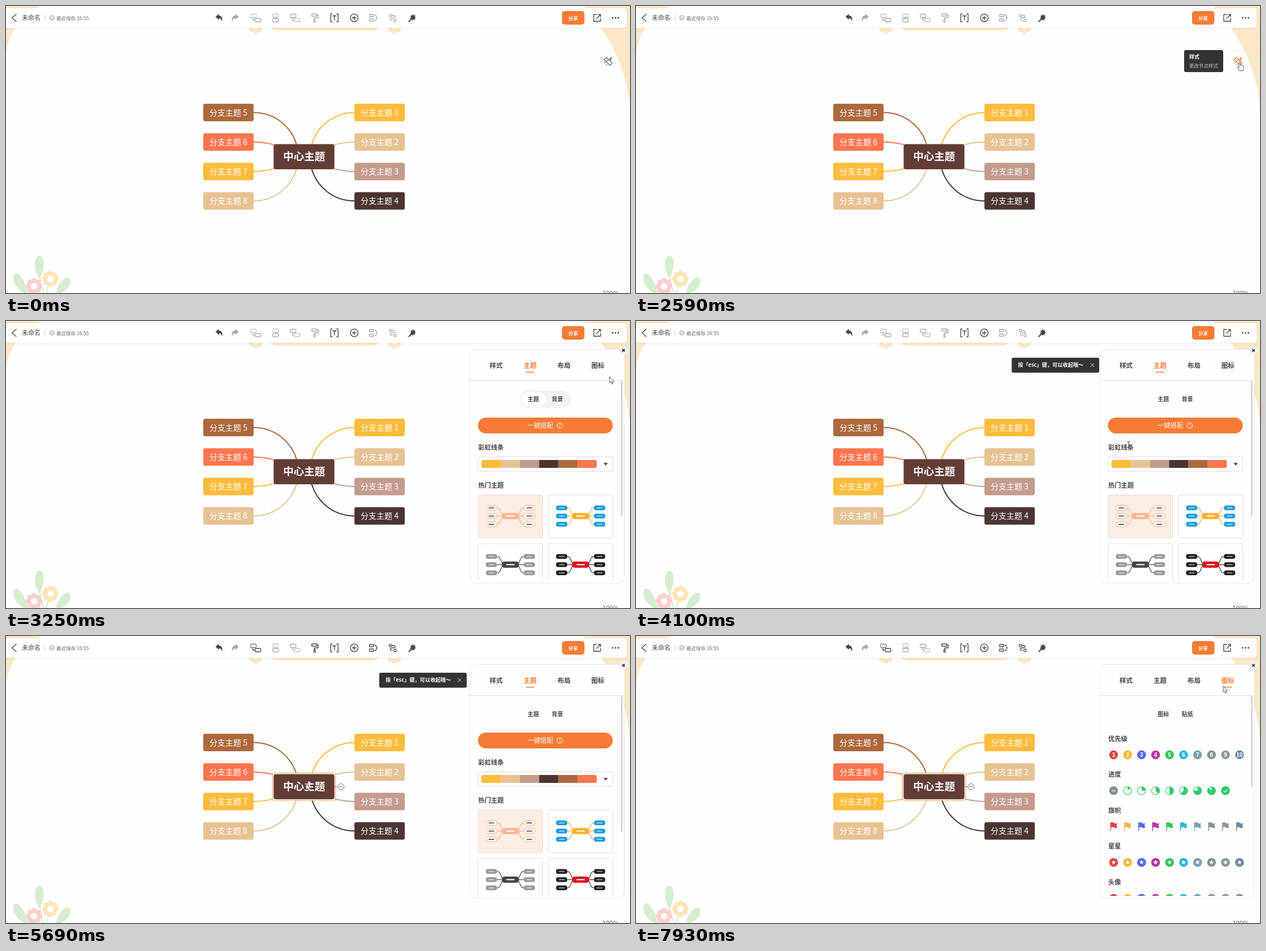
Recreate the animation shown at these times as an HTML page. Size 1102 px wide and 508 px high, loop 8000 ms.

```html
<!DOCTYPE html>
<html lang="zh-CN">
<head>
<meta charset="utf-8">
<style>
html, body { margin: 0; width: 100%; height: 100%; overflow: hidden; background: #fefefe; }
svg { display: block; width: 1102px; height: 508px; }
text { font-family: "Noto Sans CJK SC", "Noto Sans CJK", "Noto Sans CJK JP", sans-serif; }
.ln { fill: none; stroke: currentColor; stroke-width: 1.3; stroke-linecap: round; stroke-linejoin: round; }
</style>
</head>
<body>
<svg id="stage" viewBox="0 0 1102 508"></svg>
<script>
const ORANGE = '#f77b34', DARK = '#444', GREY = '#a9a9a9', CREAM = '#fbe8c8';
const WARM = ['#febb3c', '#e7c292', '#c49b8d', '#4d3434', '#ad683d', '#ff7650'];
const HUES = ['#e04444', '#f7b73c', '#4f68f2', '#b837a8', '#32c75c', '#30b4e0', '#7ba1aa', '#859293', '#8b9896', '#7088a1'];

const rect = (x, y, w, h, fill, rx = 0, more = '') =>
  `<rect x="${x}" y="${y}" width="${w}" height="${h}" fill="${fill}" rx="${rx}" ${more}/>`;
const circ = (x, y, r, fill, more = '') => `<circle cx="${x}" cy="${y}" r="${r}" fill="${fill}" ${more}/>`;
const path = (d, more = 'class="ln"') => `<path d="${d}" ${more}/>`;
const text = (x, y, s, size, fill, weight = 400, anchor = 'start') =>
  `<text x="${x}" y="${y}" font-size="${size}" fill="${fill}" font-weight="${weight}" text-anchor="${anchor}">${s}</text>`;
const group = (id, body, more = '') => `<g id="${id}" ${more}>${body}</g>`;
const at = (x, y, body, color = DARK, id = '') =>
  `<g transform="translate(${x} ${y})" color="${color}" ${id && `id="${id}"`}>${body}</g>`;
const times = (n, f) => Array.from({ length: n }, (_, i) => f(i)).join('');

function flower(x, y, r, color, core) {
  return times(8, i => circ(x + r * .68 * Math.cos(i * Math.PI / 4), y + r * .68 * Math.sin(i * Math.PI / 4), r * .33, color)) +
    circ(x, y, r * .7, color) + circ(x, y, r * .38, core);
}

function backdrop() {
  const leaf = 'fill="#d7ecd0"', stem = 'fill="none" stroke="#d7ecd0" stroke-width="2"';
  return rect(0, 0, 1102, 508, '#fefefe') +
    path('M0 0H62Q6 32 0 84Z', `fill="${CREAM}"`) +
    path('M1020 0H1102V180Q1092 78 1020 0Z', `fill="${CREAM}"`) +
    path('M1085 59H1102M1098 38V140M1090 79H1102', 'stroke="#f5dfba" stroke-width=".7"') +
    path('M465 36H661Q656 43.5 645 43.5H481Q470 43.5 465 36Z', `fill="${CREAM}"`) +
    flower(441, 35, 14, CREAM, '#fff') + flower(686, 35, 14, CREAM, '#fff') +
    path('M59 475Q62 495 67 508M78 490Q72 498 72 508M28 490Q36 500 37 508M104 490Q93 499 92 508', stem) +
    path('M59 482C48 468 49 442 59 442S69 466 59 482Z', leaf) +
    path('M38 510C20 506 9 486 14 476S36 486 38 510Z', leaf) +
    path('M89 510C88 494 104 477 111 481S112 506 89 510Z', leaf) +
    flower(78.5, 483, 14.5, '#fbe5b8', '#fff') + flower(49.5, 496, 14.5, '#fbcfcf', '#fff') +
    text(1053, 513, '100%', 11.5, '#666');
}

const box = (x, y, dash) => `<rect x="${x}" y="${y}" width="10" height="6" rx="1.5" class="ln" ${dash ? 'stroke-dasharray="1.5 2"' : ''}/>`;

function toolbar() {
  const undo = path('M-6 -2L0 -7V-4C5 -4 7 1 5.5 6C4 2 3 .8 0 .8V3.5Z', 'fill="currentColor"');
  return rect(-10, 4, 1106, 34.5, '#fff', 5, 'style="filter:drop-shadow(0 1px 2px #0001)"') +
    at(14, 21, path('M4 -6.5L-3.5 0L4 6.5')) + text(28, 25, '未命名', 11, '#444') +
    rect(68.5, 16, 1, 10, '#ccc') +
    at(81, 21, `<circle r="3.8" class="ln" style="stroke-width:.8"/>` + path('M-1.8 0L-.3 1.5L2 -1.2', 'fill="none" stroke="currentColor" stroke-width=".8"'), '#666') +
    text(89, 24.5, '最近保存 16:55', 8.5, '#666') +
    at(376, 21, undo) + at(405, 21, `<g transform="scale(-1 1)">${undo}</g>`, GREY) +
    at(441, 21, box(-9, -6.5, 1) + box(-1, 1) + path('M-5 0V4H-2'), GREY, 'toolChild') +
    at(476, 21, box(-5, -7, 1) + box(-5, 1) + path('M0 -1V1'), GREY) +
    at(510, 21, box(-8, -6.5) + box(-1, 1, 1) + path('M-4 0V4H-2'), GREY) +
    at(545, 21, path('M-5 -7H4V-3H-5ZM4 -5H6.5V0H0V3M-1.3 3H1.3V7.5H-1.3Z'), GREY, 'toolPaint') +
    at(580, 21, path('M-4 -7H-6.5V7H-4M4 -7H6.5V7H4M-3.2 -3.5H3.2M0 -3.5V4')) +
    at(615, 21, '<circle r="6.8" class="ln"/>' + path('M-3.5 0H3.5M0 -3.5V3.5')) +
    at(649, 21, path('M-7 -6H0V-2H-7ZM-7 2H0V6H-7ZM2 -5Q5 -5 5 -2V-1L7 0L5 1V2Q5 5 2 5'), GREY, 'toolSum') +
    at(683, 21, '<circle cx="-4" cy="-4" r="2.3" class="ln"/><circle cx="4" cy="4.5" r="2.3" class="ln"/>' +
      path('M-1.5 -4H2Q5 -4 4 -1Q3 0 -1 0Q-5 1 -4 4L-1 5'), GREY, 'toolLink') +
    at(717, 21, path('M-6 7L0 1', 'stroke="currentColor" stroke-width="2"') +
      path('M2 -7L3 -4L6 -5L5 -2L7 0L4.5 1L5 4L2 3L0 5L-.5 2L-4 1L-1.5 -1L-3 -4L0 -4Z', 'fill="currentColor"')) +
    rect(982, 9, 39.5, 24, ORANGE, 5) + text(1001.5, 24.5, '分享', 8.5, '#fff', 700, 'middle') +
    at(1044, 21, path('M-1 -6H-6V6H6V1M2 -6H6V-2M6 -6L-1 1')) +
    at(1076.5, 21, circ(-5, 0, 1.4, DARK) + circ(0, 0, 1.4, DARK) + circ(5, 0, 1.4, DARK));
}

function mindMap() {
  let links = '', nodes = '';
  for (let i = 0; i < 8; i++) {
    const right = i < 4, row = i % 4;
    const color = WARM[i % 6], lower = row > 1;
    const d = row % 3 ? 'M437 240.7Q460 241 478 247' : 'M437 188.5C476 189 505 214 514 248';
    const flip = `translate(${right ? 1053 : 0} ${lower ? 533.6 : 0}) scale(${right ? -1 : 1} ${lower ? -1 : 1})`;
    links += path(d, `fill="none" stroke="${color}" stroke-width="2" transform="${flip}"`);
    const x = right ? 615.3 : 348.3, y = 173 + row * 52.2;
    nodes += rect(x, y, 89, 31, color, 3.5) + text(x + 44.5, y + 20.7, `分支主题 ${i + 1}`, 14, '#fff', 400, 'middle');
  }
  return links + nodes +
    group('outline', rect(470.5, 242.5, 111.5, 48.5, '#fff', 4, 'stroke="#f79a55" stroke-width="1.2"')) +
    rect(472.6, 244.5, 107.4, 44.5, '#623d35', 4) +
    text(526.4, 273, '中心主题', 18.5, '#fff', 700, 'middle') +
    group('fold', path('M580 266.7H586', 'stroke="#a98a80"') +
      circ(591.7, 266.7, 5.3, '#fff', 'stroke="#7a6660"') + path('M588.8 266.7H594.6', 'stroke="#7a6660"'));
}

function brush() {
  return group('halo', circ(1063.5, 97.5, 18.5, '#fff', 'stroke="#eee"')) +
    at(1063.5, 98, path('M-7 -3L-3 -7L7 3L3 7ZM-3.5 .5L.5 -3.5') +
      path('M4 -7L4.9 -4.9L7 -4L4.9 -3.1L4 -1L3.1 -3.1L1 -4L3.1 -4.9Z', 'fill="currentColor"') +
      circ(-6, 2, 1, 'currentColor') + circ(-3, 6, 1, 'currentColor') + circ(6, -6.6, 1, 'currentColor'), '#666', 'brush');
}

function thumb(x, y, back, core, leaf, line, outlined) {
  const cx = x + 56.8, cy = y + 37.3;
  const arms = [-1, 1].map(s => [-14.5, 0, 14.5].map(dy => {
    const nx = cx + s * 33.5, ny = cy + dy;
    return path(`M${nx - s * 10} ${ny}C${cx + s * 15} ${ny} ${cx + s * 19} ${cy} ${cx + s * 9} ${cy}`,
        `fill="none" stroke="${line}" stroke-width="1.5"`) +
      rect(nx - 10, ny - 4.3, 20, 8.6, outlined ? '#fff' : leaf, 4, outlined ? `stroke="${leaf}"` : '') +
      rect(nx - 5, ny - .8, 10, 1.6, outlined ? '#444' : '#fff9');
  }).join('')).join('');
  return rect(x, y, 113.5, 75.5, back, 1.5, 'stroke="#ddd"') + arms +
    rect(cx - 15, cy - 5.5, 30, 11, core, 4.5) + rect(cx - 7.5, cy - 1, 15, 2, '#fff', 1);
}

const title = (y, s) => text(834, y, s, 11.25, '#444', 700);
const toggle = (a, b) => text(931.3, 142, a, 10, '#444', 700, 'middle') + text(973.7, 142, b, 10, '#444', 700, 'middle');

function themeTab() {
  return group('pill', rect(908, 123, 90, 31, '#f3f3f3', 15.5) + rect(910.5, 125.5, 42.5, 26, '#fff', 13)) +
    toggle('主题', '背景') +
    rect(833.5, 171, 238, 28, ORANGE, 14) + text(921, 189, '一键搭配', 11.3, '#fff') +
    circ(978, 185, 4.8, 'none', 'stroke="#fff"') + text(978, 188, '?', 7.5, '#fff', 400, 'middle') +
    title(228, '彩虹线条') + rect(833.5, 240.5, 238, 25.5, '#fff', 2, 'stroke="#ddd"') +
    `<clipPath id="bar">${rect(839.5, 246, 204, 14, '#000', 3)}</clipPath><g clip-path="url(#bar)">` +
    times(6, i => rect(839.5 + 34 * i, 246, 34.2, 14, WARM[i])) + '</g>' +
    path('M1055 251H1063L1059 256Z', 'fill="#555"') + title(295, '热门主题') +
    thumb(834, 308, '#fdeee3', '#fab692', '#f9ab85', '#f9b594', true) +
    thumb(958, 308, '#fff', '#fcb02b', '#1c9ddd', '#f3b95c') +
    thumb(834, 394, '#fff', '#444', '#9a9a9a', '#666') +
    thumb(958, 394, '#fff', '#e0101c', '#222', '#555');
}

function iconTab() {
  const GREEN = '#2ecc6a', X = i => 843.5 + 24.7 * i;
  const star = times(10, i => {
    const r = i % 2 ? 1.9 : 4.4, a = i * Math.PI / 5;
    return `${(r * Math.sin(a)).toFixed(2)},${(-r * Math.cos(a)).toFixed(2)} `;
  });
  const pie = i => {
    const a = i * Math.PI / 4;
    return circ(0, 0, 7.1, '#fff', `stroke="${GREEN}" stroke-width="1.1"`) +
      path(`M0 0V-7A7 7 0 ${+(i > 4)} 1 ${7 * Math.sin(a)} ${-7 * Math.cos(a)}Z`, `fill="${GREEN}"`);
  };
  const white = 'fill="none" stroke="#fff" stroke-width="1.3"';
  return toggle('图标', '贴纸') +
    ['优先级', '进度', '旗帜', '星星', '头像'].map((s, i) => title(185.5 + 63.5 * i, s)).join('') +
    HUES.map((c, i) =>
      at(X(i), 210.3, circ(0, 0, 7.8, c) + `<text y="3.6" font-size="10" font-weight="700" fill="#fff" text-anchor="middle" style="font-family:'Liberation Sans',sans-serif">${i + 1}</text>`) +
      at(X(i), 337, path('M-6 -7.5H-4.6V8H-6Z', `fill="${c}"`) + path('M-4.6 -7Q-1 -8 1 -6T6.5 -6L5 -2L6.5 2.5Q3 3.5 1 2T-4.6 2Z', `fill="${c}"`)) +
      at(X(i), 400.7, circ(0, 0, 7.8, c) + `<polygon points="${star}" fill="#fff"/>`) +
      at(X(i), 464.3, circ(0, 0, 7.8, c) + circ(0, -2, 2.3, '#fff'))).join('') +
    at(X(0), 273.8, circ(0, 0, 7.8, '#859293') + path('M-3.5 0H3.5', white)) +
    times(7, i => at(X(i + 1), 273.8, pie(i + 1))) +
    at(X(8), 273.8, circ(0, 0, 7.8, GREEN) + path('M-3.5 0L-1 2.6L3.6 -2.4', white));
}

function panel() {
  return rect(819.5, 50.5, 272.5, 413.5, '#fefefe', 11, 'stroke="#e8e8e8"') +
    ['样式', '主题', '布局', '图标'].map((s, i) => text(865.6 + 59.9 * i, 82.5, s, 11.5, '#444', 700, 'middle').replace('<text', `<text id="tab${i}"`)).join('') +
    rect(918, 89.7, 15, 1.6, ORANGE, .8, 'id="mark"') + rect(820, 105, 271, 1, '#ddd') +
    '<clipPath id="view"><rect x="820" y="106" width="271" height="354"/></clipPath><g clip-path="url(#view)">' +
    group('themes', themeTab()) + group('icons', iconTab()) + '</g>' +
    rect(1086, 106, 2.8, 240, '#d2d2d2', 1.4, 'id="scroll"') +
    circ(1090.5, 52, 8, '#f1f1f1') + path('M1088.3 49.8L1092.7 54.2M1092.7 49.8L1088.3 54.2', 'stroke="#222" stroke-width="1.6"');
}

const tip = rect(968, 78, 69, 39, '#333', 3) + text(977, 92.5, '样式', 9, '#fff', 700) + text(977, 109, '更改节点样式', 8.5, '#c4c4c4');
const toast = rect(0, 65, 154.5, 26.5, '#333', 3) + text(11, 81.3, '按「esc」键，可以收起哦～', 9.2, '#fff', 700) +
  path('M139 74.7L145.5 81.2M145.5 74.7L139 81.2', 'stroke="#ddd"');
const inked = 'fill="#fff" stroke="#444" stroke-width=".9" stroke-linejoin="round"';
const cursors =
  group('arrow', path('M0 0V11L2.5 8.8L4.4 13L6.2 12.2L4.4 8.2H7.7Z', inked)) +
  group('hand', path('M-1.2 1Q0 -1 1.2 1V6Q2.6 5 3.4 6.5Q4.6 5.8 5.3 7.2Q7 6.8 7 8.5V12Q7 14 5.5 16H-.8Q-2 13.5 -4.5 10.5Q-4 8.5 -1.2 11Z', inked)) +
  group('beam', path('M-2.5 -5H2.5M-2.5 5H2.5M0 -5V5', 'stroke="#444" fill="none"'));

document.getElementById('stage').innerHTML = backdrop() + toolbar() + mindMap() + brush() +
  group('tip', tip) + group('toast', toast) + group('panel', panel()) + group('cursor', cursors);

const $ = id => document.getElementById(id);
const show = (id, on) => $(id).setAttribute('display', on ? 'inline' : 'none');
const move = (id, x, y = 0) => $(id).setAttribute('transform', `translate(${x} ${y})`);
const within = (t, a, b) => t >= a && t < b;

// Screen updates come in runs of 120 ms steps: [start, steps].
const RUNS = [[0, 1], [1370, 2], [1990, 8], [2980, 2], [3250, 2], [3620, 17], [5690, 7], [6690, 6], [7690, 3]];
function snap(t) {
  const [start, n] = RUNS.filter(r => r[0] <= t).pop();
  return start + 120 * Math.min(n - 1, Math.floor((t - start) / 120));
}

// Pointer stops: [time, x, y].
const STOPS = [[1370, 1046, 433], [1490, 1046, 433], [1990, 1083, 116], [2230, 1066, 98.5], [3500, 1066, 98.5], [4100, 870, 219],
  [4460, 868, 219], [5060, 530, 261], [5690, 530, 261], [6410, 1062, 96], [6690, 1058, 92], [6930, 1047.5, 78], [7500, 1047.5, 78], [7930, 1037, 88.5]];
const SLIDE = [[2710, 283], [2830, 230], [2980, 17], [3100, 3], [3250, 0]];

function track(keys, t, k) {
  const i = keys.findIndex(s => s[0] > t);
  if (i < 0) return keys[keys.length - 1][k];
  if (!i) return keys[0][k];
  const a = keys[i - 1], b = keys[i], u = (t - a[0]) / (b[0] - a[0]);
  return a[k] + (b[k] - a[k]) * u * u * (3 - 2 * u);
}

function draw(time) {
  const t = snap(time);
  const hover = within(t, 2230, 2980), icons = t >= 7290, picked = t >= 5300;

  show('halo', hover);
  $('brush').setAttribute('color', hover ? ORANGE : '#666');
  show('tip', within(t, 2350, 2980));
  show('panel', t >= 2830);
  move('panel', track(SLIDE, t, 1));
  show('themes', !icons);
  show('icons', icons);
  show('pill', t < 3620 || t >= 6690);
  for (let i = 0; i < 4; i++) $('tab' + i).setAttribute('fill', i === (icons ? 3 : 1) ? ORANGE : '#444');
  $('mark').setAttribute('x', icons ? 1037.8 : 918);
  $('scroll').setAttribute('height', icons ? 162 : 240);

  show('toast', within(t, 3620, 7290));
  move('toast', 660.5 + 3 * Math.cos((t - 4100) / 1200 * 2 * Math.PI));

  show('outline', t >= 5060);
  show('fold', picked);
  for (const id of ['toolChild', 'toolPaint', 'toolSum', 'toolLink']) $(id).setAttribute('color', picked ? DARK : GREY);

  const hand = within(t, 2230, 2980) || within(t, 6930, 7810), beam = within(t, 4100, 4580);
  show('cursor', within(t, 1370, 1490) || t >= 1990);
  show('hand', hand);
  show('beam', beam);
  show('arrow', !hand && !beam);
  move('cursor', track(STOPS, t, 1), track(STOPS, t, 2));
}

function tick() {
  draw(performance.now() % 8000);
  requestAnimationFrame(tick);
}
tick();
</script>
</body>
</html>
```
